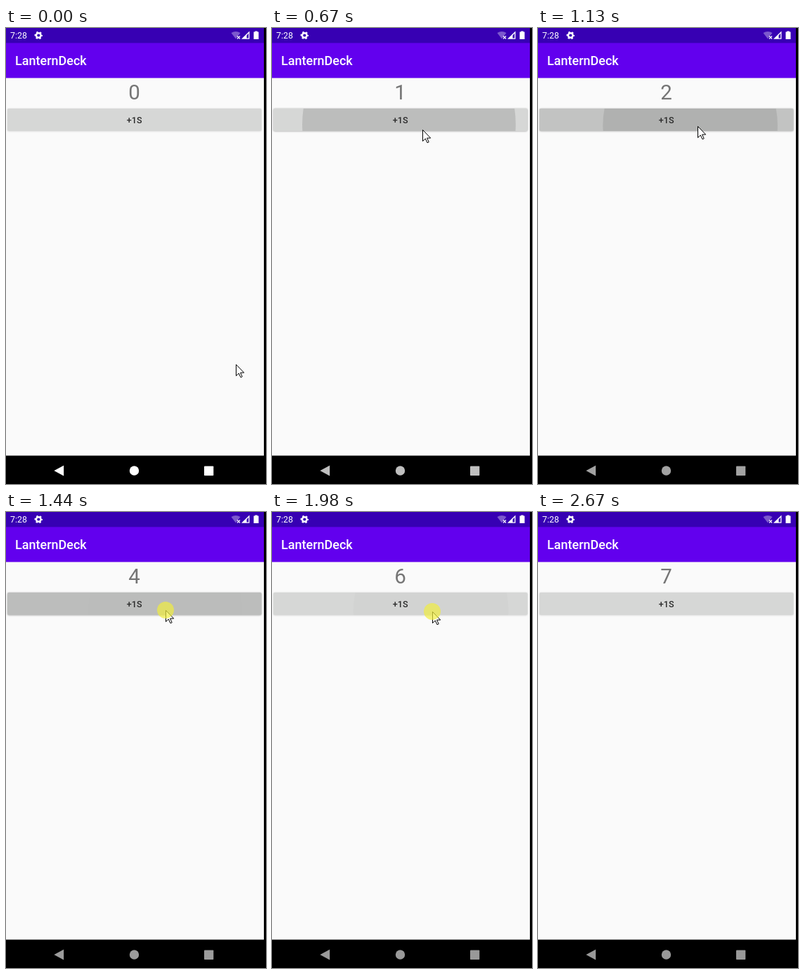
An HTML page that plays this animation: 370x651 px, repeating every 3.05 s.

```html
<!DOCTYPE html>
<html lang="en">
<head>
<meta charset="utf-8">
<title>Counter demo</title>
<style>
  html, body { margin: 0; width: 100%; height: 100%; overflow: hidden; background: #000; }
  svg { display: block; width: 370px; height: 651px; }
  text { font-family: Roboto, sans-serif; }
  .medium { font-weight: 500; }
  .middle { text-anchor: middle; }
</style>
</head>
<body>
<svg viewBox="0 0 370 651">
  <defs>
    <clipPath id="face"><rect x="2" y="115" width="361.5" height="32" rx="1.8"/></clipPath>
    <filter id="blur" x="-5%" y="-30%" width="110%" height="160%"><feGaussianBlur stdDeviation="1.1"/></filter>
  </defs>

  <rect width="367" height="610.5" fill="#fafafa"/>
  <rect width="367" height="71.4" fill="#6200ee"/>
  <rect width="367" height="21.4" fill="#3700b3"/>

  <!-- status bar -->
  <g fill="#fff">
    <text x="6" y="15" font-size="12.4">7:28</text>
    <g transform="translate(46.3 10.5)" fill="none" stroke="#fff">
      <circle r="3.3" stroke-width="2.4"/>
      <circle r="4.9" stroke-width="1.7" stroke-dasharray="2.57 2.56" stroke-dashoffset="1.28"/>
    </g>
    <path d="M320.5 7Q327 2.8 333.5 7L327 15.5Z" opacity=".35"/>
    <path d="M329 11.5l4 4m0-4l-4 4" stroke="#fff" stroke-width="1.2"/>
    <path fill-rule="evenodd" d="M335 15.8L346.5 4.5V15.8ZM342.5 10.5V14.5H345.2V7.8Z"/>
    <path d="M354.3 4.4h3.4v1.2h1.8v10.4h-7V5.6h1.8Z"/>
  </g>

  <text class="medium" x="13" y="53" font-size="18" fill="#fff">LanternDeck</text>
  <text class="middle" id="count" x="182.5" y="102" font-size="29.5" fill="#757575">0</text>

  <!-- button -->
  <rect id="shade" x="2" y="115.3" width="361.5" height="32.2" rx="2" filter="url(#blur)"/>
  <rect x="2" y="115" width="361.5" height="32" rx="1.8" fill="#d6d7d6"/>
  <g id="ripples" clip-path="url(#face)"></g>
  <text class="medium middle" x="182.7" y="136" font-size="12.6" fill="#2c2c2c">+1S</text>

  <!-- navigation bar -->
  <g id="nav">
    <path d="M68.4 632L82.2 624.4V639.6Z"/>
    <circle cx="182.5" cy="632" r="6.7"/>
    <rect x="282" y="625.5" width="13.3" height="13.5" rx=".8"/>
  </g>

  <g id="pointer">
    <path d="M.5.5V16.6L4.3 13L7 18.8L9.2 17.8L6.6 12.1H11.7Z" fill="#fff" stroke="#000"/>
    <circle id="press" r="12" fill="#f0ec40" opacity=".7"/>
  </g>
</svg>
<script>
  const LOOP = 3050;
  const STEP = 230 / 3;      // screen refresh
  const FIRST_STEP = 53;
  const PRESSES = [580, 876, 1073, 1247, 1420, 1594, 1950];
  const COUNT_DELAY = 78;
  const GONE = 2425;

  const $ = id => document.getElementById(id);
  const clamp = x => Math.max(0, Math.min(1, x));
  const mix = (a, b, p) => a + (b - a) * p;
  const smooth = p => p * p * (3 - 2 * p);
  const span = (t, from, to) => clamp((t - from) / (to - from));

  // Sweep up to the button, drift while clicking, then sweep away.
  function pointerAt(t) {
    const arrive = smooth(span(t, 0, 355));
    const drift = span(t, 360, 1126);
    const leave = smooth(span(t, 1950, 2380));
    return [
      327 - 121 * arrive + 21 * drift + 127 * leave,
      480 - 331.6 * arrive - 8.4 * drift + 396 * leave
    ];
  }

  // cubic-bezier(.4, 0, .2, 1)
  function ease(x) {
    let lo = 0, hi = 1;
    for (let i = 0; i < 20; i++) {
      const s = (lo + hi) / 2, q = 1 - s;
      if (1.2 * s * q * q + 0.6 * s * s * q + s ** 3 < x) lo = s; else hi = s;
    }
    return smooth(lo);
  }

  const ripples = PRESSES.map(start => {
    const node = document.createElementNS('http://www.w3.org/2000/svg', 'circle');
    $('ripples').append(node);
    const [x, y] = pointerAt(start);
    return { node, start, x, y };
  });

  function drawRipple({ node, start, x, y }, t) {
    const age = t - start;
    const p = ease(span(age, 0, 225));
    const alpha = 0.12 * smooth(span(age, 0, 75)) * (1 - span(age, 225, 345));
    node.setAttribute('cx', mix(x, 182.5, p));
    node.setAttribute('cy', mix(y, 131, p));
    node.setAttribute('r', mix(109, 183, p));
    node.setAttribute('fill-opacity', alpha);
    return alpha;
  }

  function draw(t) {
    const glow = Math.max(...ripples.map(r => drawRipple(r, t)));
    $('shade').setAttribute('fill-opacity', 0.16 + glow * 1.5);
    $('count').textContent = PRESSES.filter(s => t >= s + COUNT_DELAY).length;

    const [x, y] = pointerAt(t).map(Math.round);
    $('pointer').setAttribute('transform', `translate(${x} ${y})`);
    $('pointer').style.display = t < GONE ? '' : 'none';
    const held = PRESSES.some(s => Math.abs(t - s) < 45);
    $('press').style.display = held ? '' : 'none';

    const grey = Math.round(153 + 102 * Math.exp(-((t / 670) ** 1.7)));
    $('nav').setAttribute('fill', `rgb(${grey},${grey},${grey})`);
  }

  const origin = performance.now();
  function loop() {
    const t = (performance.now() - origin) % LOOP;
    draw(Math.max(0, FIRST_STEP + Math.floor((t - FIRST_STEP) / STEP) * STEP));
    requestAnimationFrame(loop);
  }
  loop();
</script>
</body>
</html>
```
